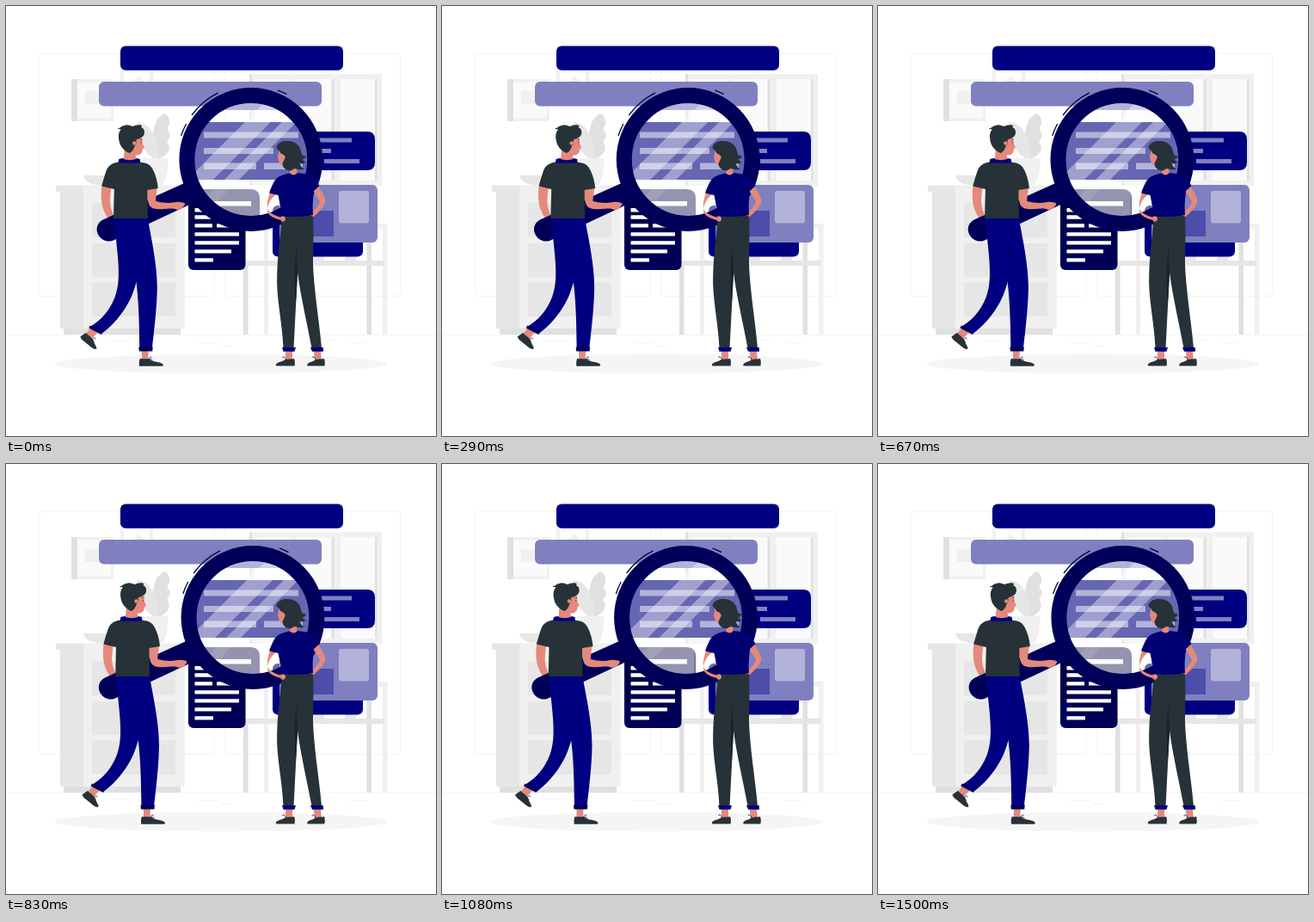
These frames come from a looping animation (500x500 px, 1.54 s). An HTML page:

```html
<!DOCTYPE html>
<html lang="en">
<head>
<meta charset="utf-8">
<title>Search scene</title>
<style>
  html, body { margin: 0; width: 100%; height: 100%; overflow: hidden; background: #fff; }
  svg { display: block; width: 100vw; height: 100vh; }
  .navy { fill: #000080; }
  .deep { fill: #00005a; }
  .mid { fill: #8080c0; }
  .ink { fill: #263238; }
  .skin { fill: #e4897b; }
  .g0 { fill: #fafafa; }
  .g1 { fill: #f0f0f0; }
  .g2 { fill: #e6e6e6; }
  .g3 { fill: #e0e0e0; }
  .line { fill: none; stroke: #ebebeb; stroke-width: .6; }
  .fold { fill: none; stroke: #00005a; stroke-width: .8; stroke-linecap: round; }
</style>
</head>
<body>
<svg viewBox="0 0 500 500" xmlns="http://www.w3.org/2000/svg">
  <defs>
    <clipPath id="lensClip"><circle id="lensHole" cx="285" cy="178.5" r="67"/></clipPath>
    <clipPath id="glassClip"><circle cx="285" cy="178.5" r="67"/></clipPath>
    <linearGradient id="paper" x1="0" y1="0" x2="0" y2="1">
      <stop offset="0" stop-color="#000040"/><stop offset="1" stop-color="#00005a"/>
    </linearGradient>
  </defs>

  <!-- room -->
  <g id="room">
    <rect class="line" x="38.5" y="55" width="204" height="282.5" rx="4"/>
    <rect class="line" x="254.5" y="55" width="204" height="282.5" rx="4"/>
    <path class="line" d="M0 382.4H500M118 389.5h27M222 391.5h25M250 395.3h14M371 388.5h10M400 391.5h19"/>
    <path class="g1" d="M76 85h49v49H76z"/>
    <path class="g3" d="M76 85h7v49h-7z"/>
    <path class="g0" d="M83 88.5h39v42H83z"/>
    <path class="g1" d="M92 99h16v15H92z"/>
    <path class="g1" d="M133 74h38v14h-38z"/>
    <path fill="#fff" d="M137 74h30v14h-30z"/>
    <path class="g1" d="M148 88l6-7 6 7z"/>
    <path class="g1" d="M283 79h154v130H283z"/>
    <path class="g0" d="M289 85h42v118h-42zM337 85h42v118h-42zM389 85h40v118h-40z"/>
    <path class="g3" d="M283 79h3v130h-3zM378.500 85h3v118h-3zM429 85h2.500v118h-2.500z"/>
    <path class="g2" d="M63 214h27v161H63z"/>
    <path class="g1" d="M90 214h118v161H90z"/>
    <path class="g2" d="M58 208.500h33v7.500H58z"/>
    <path class="g1" d="M90 208.500h118v7.500H90z"/>
    <path class="g2" d="M100 229h97v40h-97zM100 276h97v39h-97zM100 321.500h97v39.500h-97z"/>
    <path class="g3" d="M67 375h136v7H67z"/>
    <path class="g2" d="M90 197h44c-2 8-10 11.500-22 11.500S92 205 90 197z"/>
    <path class="g3" d="M172 178c-5-18-1-31 1-39 2-8 8-13 12-14 4 3 6 8 5 13-3 3-3 6 0 9 2 5-1 8-3 11 4 4 3 10 1 12-4 6-8 6-11 9z"/>
    <path class="g2" d="M173 179c-4-4-14-10-16-20-4-10-5-19-4-24 8 1 14 5 17 12 6 10 8 21 7 32z"/>
    <path class="g1" d="M157 177h31c1 12-1 23-6 31.500h-20c-4-9-6-20-5-31.500z"/>
    <path class="g1" d="M300 253h143.500v6H300zM438 253h5.500v129H438zM300 259h5v123h-5z"/>
    <path class="g3" d="M276 296h5.500v86H276zM419.500 259h5.500v123h-5.500z"/>
    <path class="g2" d="M276 296h164v6H276zM355 291h15v5h-15zM394 291h13v5h-13z"/>
    <ellipse cx="249.500" cy="416" rx="193.500" ry="11.300" fill="#f5f5f5"/>
  </g>

  <!-- panels -->
  <rect class="navy" x="133" y="46.500" width="259" height="28.200" rx="6"/>
  <rect class="mid" x="108" y="88" width="259" height="28.500" rx="6"/>
  <path class="navy" d="M357 146h63q9 0 9 9v27q0 9-9 9h-63z"/>
  <path class="mid" d="M357 153.500h45v5h-45zM357 166h21v5h-21zM370 178h41v5h-41z"/>
  <rect class="navy" x="310" y="232" width="105" height="59.500" rx="6"/>
  <rect class="mid" x="318" y="208" width="114" height="67" rx="6"/>
  <rect x="387" y="215" width="35" height="37.500" rx="3" fill="#b3b3d9"/>
  <path fill="#4d4daa" d="M345 238h36v30h-36z"/>
  <rect x="212" y="213" width="66.500" height="94" rx="6" fill="url(#paper)"/>
  <g id="rows" fill="#fff"></g>

  <!-- magnified view stays put, only its window moves -->
  <g clip-path="url(#lensClip)">
    <path class="mid" d="M200 100h170v21H200z"/>
    <path class="navy" d="M205 135h160v67H205z"/>
    <path class="mid" d="M230 146.500h110v7H230zM230 165h81v7h-81zM230 182.500h61v7.500h-61zM300 182.500h45v7.500h-45z"/>
    <path fill="#000040" d="M200 213h84q11 0 11 11v40h-95z"/>
    <path fill="#fff" d="M220 227h65v5.500h-65z"/>
  </g>

  <g id="mover">
    <!-- glass -->
    <circle cx="285" cy="178.500" r="67" fill="#fff" opacity=".4"/>
    <g clip-path="url(#glassClip)" fill="#fff" opacity=".38">
      <path d="M303 110h30L193 250h-30z"/>
      <path d="M346 110h17L223 250h-17z"/>
      <path d="M205 213h90v40h-90z" opacity=".8"/>
    </g>
    <!-- left arm behind the handle -->
    <path class="skin" d="M112 206C110 220 110 232 117 244L122 252 127 249 124 240C120 232 121 221 123 210z"/>
    <!-- magnifier -->
    <path class="deep" d="M114 248L212 204 222 227 126 272C119 276 110 272 107 265 104 258 107 251 114 248z"/>
    <circle cx="285" cy="178.500" r="74.400" fill="none" stroke="#00005a" stroke-width="18"/>
    <path fill="none" stroke="#00003c" stroke-width="1.300" stroke-linecap="round"
      d="M216.500 126.500A86.500 86.500 0 0 1 246.500 101.200M204 150.500A86.500 86.500 0 0 1 209.500 137.500M316.500 98.200A86.500 86.500 0 0 1 326 102.400"/>

    <!-- man: feet and legs -->
    <path class="skin" d="M100 373L108 378 100 387 93 381z"/>
    <path class="ink" d="M86.500 384.500L93 380C97 384 101 386 102.500 390 103 394 106 396 105.500 398.500 103 400 99 397 96 394 93 391 88 389 86.500 384.500z"/>
    <path class="navy" d="M126 247C128 280 136 315 127 338 121 354 111 365 98 373L112 380.500C128 369 143 349 149 330 155 314 157 298 154 270L150 247z"/>
    <path class="deep" d="M98 371.500L113 379 111 382 96.500 374.500z"/>
    <path class="skin" d="M158 399h8l-.5 13h-7.500z"/>
    <path class="ink" d="M156 410C160 411 163 409.500 167 411 172 414.500 181 413.500 183 417q0 1.700-1 1.700H155.200C154.800 415 155 412 156 410z"/>
    <path class="fold" d="M165.500 411.500c1-3 3-4 4-3M166 411c2-1 4 0 4.500 1M101 387c2-2 3-1 3 0"/>
    <path class="navy" d="M127 247H165C169 270 176 300 176 328 175.500 355 172 380 170 399H155.500C155 370 155 340 150 309 146 290 133 270 127 247z"/>
    <path class="deep" d="M154.500 396.500h16.500l-.6 5h-15.400z"/>
    <path class="fold" d="M151.500 276c3 12 3 25 1 38"/>

    <!-- man: arm, shirt, head -->
    <path class="skin" d="M163 211L176 212C175 220 174 225 174.500 227 181 229 190 229.500 195 228.500 200 227 205 228 208.500 229.500 208 233 204 236.500 199 237 195 235 190 235.500 184 236 177 237 169 236 166.500 231 164.500 225 163 218 163 211z"/>
    <path class="ink" d="M131 181.500C123 182.500 118 186 116 194 114 200 112.500 205 111.500 209.500L126 213 125.200 247H165L164.500 214 177 212C176.500 204 173 190 167 185 164 182.500 160 182 155 181.500z"/>
    <path class="navy" d="M131.500 178C138 176 149 176 156 178L156.500 182.500H130.500z"/>
    <path class="skin" d="M138 166L150 168 151.500 178C147 179.500 141 179.500 137 178z"/>
    <path class="skin" d="M145 153C150 151 156 151.500 158.500 154L159 160 161 165 159 166.500C159 171 156 174 151 173.500L141 171z"/>
    <path class="ink" d="M131.500 156C130.500 150 131.500 146 134 143.500 131.500 143.500 130.500 142.500 130 142 134 142.500 134 139 138 139 141 137.500 144 139 147 140 151 138.500 156 137 158.500 139.500 157.500 140.500 157 141 158 141.500 161 142.500 162 147 160.500 150 158 154.500 153 154 151.500 156 152.500 160 151 162 150 162 149 166 147 170 143.500 171 137 168 132.500 163 131.500 156z"/>
    <circle class="skin" cx="149.500" cy="159.500" r="2.300"/>
    <path fill="none" stroke="#263238" stroke-width=".8" d="M156.500 155.500l2-.5M157.300 158v1.500"/>
  </g>

  <!-- woman -->
  <g>
    <path class="skin" d="M325 398h8v14h-8zM357.500 398l8 0 1.500 14h-8z"/>
    <path id="shoe" class="ink" d="M335 410C331 411 328 410 324 411.500 321 414 315 414 313.800 417q0 1.500 1 1.500H335.500C336.300 415 336 412 335 410z"/>
    <path class="ink" transform="translate(35 0) translate(334 0) scale(.93 1) translate(-334 0)" d="M335 410C331 411 328 410 324 411.500 321 414 315 414 313.800 417q0 1.500 1 1.500H335.500C336.300 415 336 412 335 410z"/>
    <path class="fold" d="M325.500 411c-1-3-3-4-4-2.500M360 411c-1-3-3-4-4-2.500"/>
    <path class="ink" d="M321 242H357C358 262 357 283 357 300 358 330 364 365 367 398H355.500C350 368 343 340 339 310L334.500 398H322.500C321 365 314 340 315.200 312 316 285 320 262 321 242z"/>
    <path d="M338.500 278c-1 10 0 22 .5 32l-2 35c-2-22-2-50 1.500-67z" fill="#192227"/>
    <path class="navy" d="M321 397h16l-1.500 4.700h-13zM354 397h14.700l.3 4.700h-13z"/>
    <path class="skin" d="M308 215C304 224 303 232 304.500 237 308 242 314 244 319 245.500 321 244 325 244 325 248 324 251.500 321 251.500 319.500 249 313 247 306 245 304 239 303.500 230 309 222 316 218z"/>
    <path class="skin" d="M355 212L362.500 209C367 215 371 222 371.500 227 370 234 363 240 358 245L354 243.500C354.500 240 356 239 358 238 362 234 365 230 365 227 362 222 358 217 355 212z"/>
    <path fill="#000073" d="M330 194.500C322 196 316 198 312.500 203 309.500 208 307.500 213 306 217.500L316.500 220C318 228 320 236 320.500 243.500 332 246 346 245 357 243 356 233 357 225 358 215L364.500 209C361 203 358 198.500 354 197 349 195 344 194.500 339 194z"/>
    <path class="skin" d="M331 184L338 185 338.500 194.500C336 197 333 197 330 194.500z"/>
    <path class="skin" d="M317 169L316 176 317.500 181C318 184 321 185.500 325 185L327 172z"/>
    <path class="ink" d="M314.500 164C316 158.500 322 156.500 328 157 336 157 342 162 343 169 344 174 346 175 349 174 348 177 346 178 344.500 178 346 180.500 348 181.500 348.500 181.500 346 184 343 183.500 341.500 183 342.500 186 345 189 347 189.500 342 191 338 189.500 335 189 331 193.500 325 191 322.500 187 320.500 184 322 182 323 180 325 177 324 172 320.500 172 319 171 318 169 317.500 167.500 316 167.500 314.500 166 314.500 164z"/>
    <circle class="skin" cx="322.500" cy="176" r="2.200"/>
    <path class="fold" d="M331 243.500v-2M354 240l1.500 3"/>
  </g>
</svg>
<script>
  const D = 1500, LOOP = 1540, STEP = 1000 / 24, LEAD = 29;
  const REST = 285;
  // horizontal shake, one stop per tenth of the cycle
  const STOPS = [0, -1, 2, -4, 4, -4, 4, -4, 2, -1, 0];
  const mover = document.getElementById('mover');
  const hole = document.getElementById('lensHole');

  // text rows on the sheet: x, y, width
  const rows = [[219.5, 235, 22], [219.5, 243.3, 31], [219.5, 253.2, 20.5], [245, 253.2, 26],
    [219.5, 263.2, 51.5], [219.5, 273.2, 51.5], [219.5, 283.2, 42.5], [219.5, 293.2, 21.5]];
  document.getElementById('rows').innerHTML = rows.map(([x, y, w]) =>
    `<rect x="${x}" y="${y}" width="${w}" height="4.4" rx=".6"/>`).join('');

  function shake(ms) {
    const p = (ms + LEAD) % D / D * 10;
    const i = Math.floor(p);
    return STOPS[i] + (STOPS[i + 1] - STOPS[i]) * (p - i);
  }

  // the motion runs at 24 pictures a second
  function draw(t) {
    const dx = shake(Math.floor((t % LOOP + 5) / STEP) * STEP);
    mover.setAttribute('transform', `translate(${dx.toFixed(3)} 0)`);
    hole.setAttribute('cx', REST + dx);
  }

  const start = performance.now();
  function tick() {
    draw(performance.now() - start);
    requestAnimationFrame(tick);
  }
  draw(0);
  requestAnimationFrame(tick);
</script>
</body>
</html>
```
